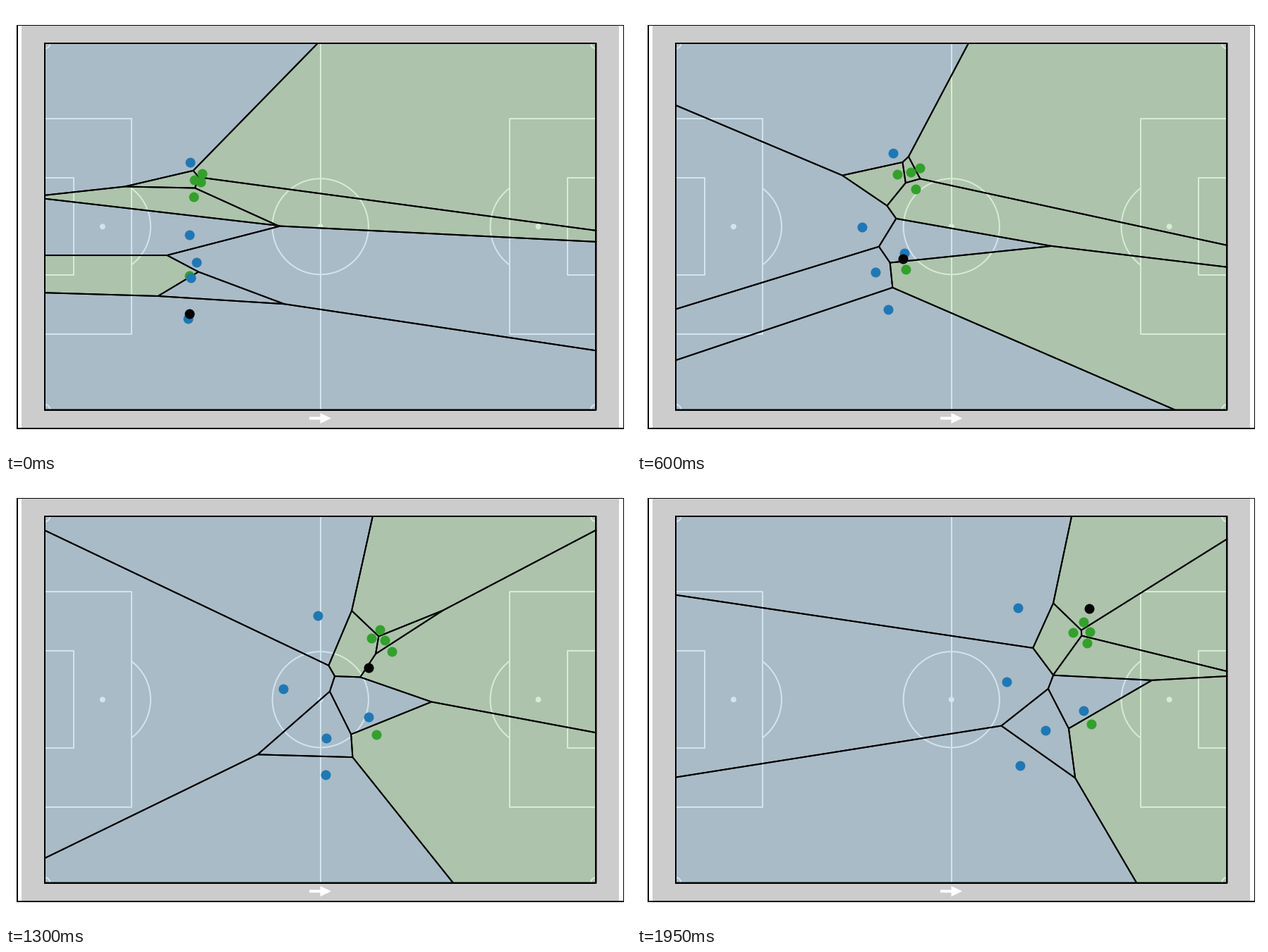
A matplotlib script that plays this animation: 886 by 632 pixels, repeating every 2000 ms.

```python
import numpy as np
import matplotlib.pyplot as plt
from matplotlib.animation import FuncAnimation
from matplotlib.collections import PolyCollection
from matplotlib.colors import to_rgba
from matplotlib.patches import Arc, Circle, Polygon, Rectangle

W, H, DPI = 886, 632, 64
PT = 72 / DPI  # points per pixel
FRAMES, STEP = 40, 50
BLUE, GREEN, GREY = "#1f78b4", "#33a02c", "#cccccc"

L, R, T, B = 55, 836.5, 53, 573.5
CX, CY = (L + R) / 2, (T + B) / 2
M = (R - L) / 105  # pixels per metre

# Waypoints of each player: x then y at every time in KEYS
KEYS = [0, 5, 12, 16, 26, 33, 39]
BLUES = np.array([
    [[261.2, 291.8, 362.8, 398.3, 442.4, 498.2, 540.1],
     [221.7, 215.8, 209.1, 205.7, 194.0, 186.6, 183.2]],
    [[260.2, 288.6, 318.6, 332.6, 392.9, 468.9, 524.5],
     [325.0, 322.4, 313.9, 308.4, 297.8, 293.8, 288.1]],
    [[270.3, 318.5, 378.8, 397.2, 514.4, 562.9, 633.2],
     [364.0, 356.5, 350.8, 346.8, 337.8, 332.5, 329.1]],
    [[262.0, 293.2, 338.5, 386.7, 454.2, 531.1, 579.1],
     [386.1, 383.1, 378.4, 375.0, 367.7, 362.2, 357.0]],
    [[258.4, 309.9, 356.3, 402.5, 452.7, 507.4, 543.4],
     [443.5, 436.6, 431.4, 428.8, 420.4, 416.3, 407.4]],
])
GREENS = np.array([
    [[277.6, 327.6, 401.5, 434.1, 530.4, 594.9, 633.1],
     [237.7, 232.5, 229.5, 223.0, 213.5, 209.0, 202.8]],
    [[267.0, 313.9, 369.4, 428.5, 518.5, 571.0, 618.0],
     [246.5, 245.2, 239.2, 234.0, 226.0, 222.5, 218.4]],
    [[276.0, 315.6, 388.3, 447.1, 536.7, 590.5, 642.0],
     [249.6, 243.6, 236.4, 237.5, 229.1, 221.0, 217.0]],
    [[266.5, 343.9, 394.9, 448.6, 546.8, 593.5, 638.1],
     [270.5, 266.1, 259.9, 257.2, 244.7, 236.3, 232.9]],
    [[260.2, 310.5, 381.2, 415.2, 524.6, 565.5, 644.4],
     [383.1, 379.0, 374.0, 371.4, 363.0, 356.0, 348.4]],
])
BALL = np.array([[260, 437], [641, 183.5]])


def positions(team, i):
    return np.array([[np.interp(i, KEYS, axis) for axis in p] for p in team])


def clip(poly, point, normal):
    """Keep the part of poly on the inner side of a line."""
    side = (poly - point) @ normal
    out = []
    for k in range(len(poly)):
        a, b, p, q = poly[k - 1], poly[k], side[k - 1], side[k]
        if p * q < 0:
            out.append(a + (b - a) * p / (p - q))
        if q <= 0:
            out.append(b)
    return np.array(out).reshape(-1, 2)


def voronoi(sites):
    cells = []
    for s in sites:
        cell = np.array([[L, T], [R, T], [R, B], [L, B]], float)
        for o in sites:
            if o is not s and np.any(o != s):
                cell = clip(cell, (s + o) / 2, o - s)
        cells.append(cell)
    return cells


fig = plt.figure(figsize=(W / DPI, H / DPI), dpi=DPI, facecolor="white")
ax = fig.add_axes([0, 0, 1, 1])
ax.set(xlim=(0, W), ylim=(H, 0))
ax.axis("off")


def box(x, y, w, h, color):
    ax.add_patch(Rectangle((x, y), w, h, fc=color, lw=0, zorder=0))


def chalk(x, y):
    ax.plot(x, y, color="white", lw=2 * PT, zorder=1)


def arc(x, y, r, start=0, end=360):
    ax.add_patch(Arc((x, y), 2 * r, 2 * r, theta1=start, theta2=end,
                     ec="white", lw=2 * PT, zorder=1))


def spot(x):
    ax.add_patch(Circle((x, CY), 4, fc="white", lw=0, zorder=1))


def draw_ground():
    box(22, 27, 847, 573, GREY)
    box(15, 27, 2, 574, "black")
    box(15, 599, 861, 2, "black")
    box(15, 27, 861, 1, "black")
    box(875, 27, 1, 574, "black")

    chalk([CX, CX], [T, B])
    arc(CX, CY, 9.15 * M)
    spot(CX)
    bend = np.degrees(np.arccos(5.5 / 9.15))
    for goal, d, mid in ((L, 1, 0), (R, -1, 180)):
        for depth, half in ((16.5, 153.2), (5.5, 69)):
            x = goal + d * depth * M
            chalk([goal, x, x, goal],
                  [CY - half, CY - half, CY + half, CY + half])
        spot(goal + d * 11 * M)
        arc(goal + d * 11 * M, CY, 9.15 * M, mid - bend, mid + bend)
    for k, (x, y) in enumerate([(L, T), (R, T), (R, B), (L, B)]):
        arc(x, y, M, 90 * k, 90 * k + 90)

    y = 585.5
    ax.add_patch(Polygon([(430, y - 2), (445.5, y - 2), (445.5, y - 7.5),
                          (461, y), (445.5, y + 7.5), (445.5, y + 2),
                          (430, y + 2)], fc="white", lw=0))
    ax.add_patch(Rectangle((L, T), R - L, B - T, fill=False, ec="black",
                           lw=2 * PT, zorder=3))


def dots(color, z):
    return ax.plot([], [], "o", ms=14 * PT, mew=0, color=color, zorder=z)[0]


draw_ground()
fills = [to_rgba(c, 0.2) for c in [BLUE] * 5 + [GREEN] * 5]
cells = PolyCollection([], facecolors=fills, edgecolors="black",
                       linewidths=2 * PT, joinstyle="round", zorder=2)
ax.add_collection(cells, autolim=False)
green_dots, blue_dots, ball_dot = dots(GREEN, 4), dots(BLUE, 5), dots("black", 6)


def update(i):
    blues, greens = positions(BLUES, i), positions(GREENS, i)
    cells.set_verts(voronoi(np.vstack([blues, greens])))
    blue_dots.set_data(*blues.T)
    green_dots.set_data(*greens.T)
    x, y = BALL[0] + (BALL[1] - BALL[0]) * i / (FRAMES - 1)
    ball_dot.set_data([x], [y])
    return cells, green_dots, blue_dots, ball_dot


anim = FuncAnimation(fig, update, frames=FRAMES, interval=STEP,
                     repeat=True, repeat_delay=0, blit=False)
plt.show()
```
